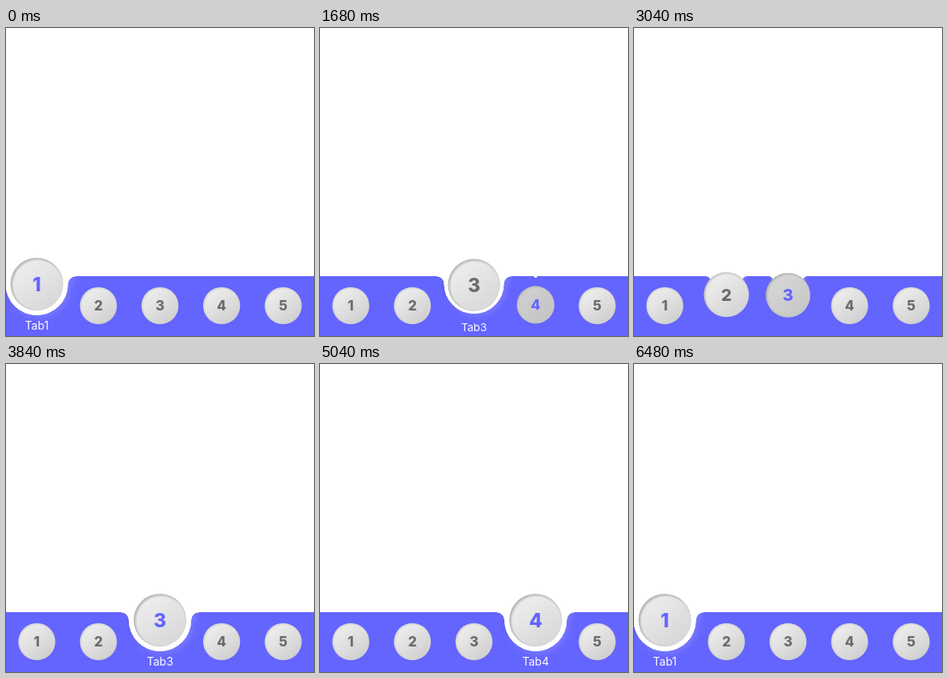
These frames come from a looping animation (386x386 px, 7.76 s). An HTML page with a canvas:

```html
<!DOCTYPE html>
<html lang="en">
<head>
<meta charset="utf-8">
<title>Tab bar</title>
<style>
  html, body { margin: 0; width: 100%; height: 100%; overflow: hidden; background: #fff; }
  canvas { display: block; width: 386px; height: 386px; }
</style>
</head>
<body>
<canvas id="stage"></canvas>
<script>
const SIZE = 386, LOOP = 7760, DURATION = 300;
const TABS = 5, BAR_TOP = 311, ACCENT = '#6464ff';

// Each click selects a tab; the pressed tint begins `lead` ms before it.
const clicks = [
  { tab: 0, at: -2000, lead: 1 },
  { tab: 1, at: 345, lead: 1 },
  { tab: 2, at: 1005, lead: 170 },
  { tab: 3, at: 1664, lead: 120 },
  { tab: 1, at: 2325, lead: 170 },
  { tab: 2, at: 2955, lead: 170 },
  { tab: 4, at: 4010, lead: 170 },
  { tab: 3, at: 4440, lead: 100 },
  { tab: 1, at: 5605, lead: 170 },
  { tab: 0, at: 6180, lead: 110 }
];

const canvas = document.getElementById('stage');
const ctx = canvas.getContext('2d');
const ratio = window.devicePixelRatio || 1;
canvas.width = canvas.height = SIZE * ratio;

const clamp = v => Math.max(0, Math.min(1, v));
const mix = (a, b, k) => a + (b - a) * k;
const gray = v => `rgb(${v},${v},${v})`;

// CSS "ease": cubic-bezier(.25, .1, .25, 1)
function ease(x) {
  if (x <= 0 || x >= 1) return clamp(x);
  const bezier = (a, b, s) => 3 * (1 - s) ** 2 * s * a + 3 * (1 - s) * s * s * b + s ** 3;
  let lo = 0, hi = 1;
  for (let i = 0; i < 20; i++) {
    const mid = (lo + hi) / 2;
    if (bezier(.25, .25, mid) < x) lo = mid; else hi = mid;
  }
  return bezier(.1, 1, lo);
}

function tabStates(t) {
  let last = 0;
  clicks.forEach((c, i) => { if (c.at <= t) last = i; });
  const current = clicks[last], previous = clicks[last - 1];
  const k = ease((t - current.at) / DURATION);
  return Array.from({ length: TABS }, (_, i) => ({
    label: i + 1,
    x: (i + .5) * SIZE / TABS,
    active: i === current.tab,
    open: i === current.tab ? k : previous && i === previous.tab ? 1 - k : 0,
    press: Math.max(...clicks.filter(c => c.tab === i).map(c =>
      clamp(Math.min((t - c.at + c.lead) / c.lead, (c.at + 320 - t) / 300))))
  }));
}

function notchPath(x, k) {
  ctx.beginPath();
  ctx.moveTo(x - 49 * k, BAR_TOP - 2);
  ctx.lineTo(x - 49 * k, BAR_TOP);
  ctx.arc(x - 49 * k, BAR_TOP + 10 * k, 10 * k, -Math.PI / 2, 0);
  ctx.arc(x, BAR_TOP + 10 * k, 39 * k, Math.PI, 0, true);
  ctx.arc(x + 49 * k, BAR_TOP + 10 * k, 10 * k, Math.PI, Math.PI * 1.5);
  ctx.lineTo(x + 49 * k, BAR_TOP - 2);
  ctx.closePath();
}

function drawNotch({ x, open }) {
  if (open <= 0) return;
  ctx.save();
  ctx.beginPath();
  ctx.rect(0, BAR_TOP, SIZE, SIZE - BAR_TOP);
  ctx.clip();
  notchPath(x, open);
  ctx.fillStyle = '#fff';
  for (const [color, offset, blur] of [['#5050d8', -1.5, 4], ['#7b7bff', 3, 8]]) {
    ctx.shadowColor = color;
    ctx.shadowOffsetX = ctx.shadowOffsetY = offset * open * ratio;
    ctx.shadowBlur = blur * open * ratio;
    ctx.fill();
  }
  ctx.restore();
  notchPath(x, open);
  ctx.fillStyle = '#fff';
  ctx.fill();
}

function drawText(text, x, y, size, weight, color) {
  ctx.font = `${weight} ${size}px Inter, sans-serif`;
  ctx.textAlign = 'center';
  ctx.fillStyle = color;
  ctx.fillText(text, x, y + size * .364);
}

function drawButton({ label, x, active, open, press }) {
  const y = mix(348, 321, open), r = mix(23.2, 33, open), scale = r / 23.2;
  ctx.beginPath();
  ctx.arc(x, y, r, 0, Math.PI * 2);

  const face = ctx.createLinearGradient(x - r * .6, y - r * .8, x + r * .6, y + r * .8);
  face.addColorStop(0, gray(mix(238, 208, press)));
  face.addColorStop(1, gray(mix(mix(208, 216, open), 196, press)));
  ctx.fillStyle = face;
  ctx.fill();

  // inset shadow, strongest at the top left
  const rim = ctx.createRadialGradient(x + scale, y + scale, r - 2 * scale, x + scale, y + scale, r + 1.5 * scale);
  rim.addColorStop(0, 'rgba(0,0,0,0)');
  rim.addColorStop(1, `rgba(0,0,0,${mix(.12, .3, open)})`);
  ctx.fillStyle = rim;
  ctx.fill();

  drawText(label, x, y, 17 * scale, 800, active ? ACCENT : '#6c6c6c');
}

function drawLabel({ label, x, open }) {
  if (open <= 0) return;
  ctx.globalAlpha = open;
  drawText('Tab' + label, x, mix(428, 373, open), 14 * mix(.3, 1, open), 400, '#fff');
  ctx.globalAlpha = 1;
}

function draw(now) {
  const tabs = tabStates(now % LOOP);
  ctx.setTransform(ratio, 0, 0, ratio, 0, 0);
  ctx.fillStyle = '#fff';
  ctx.fillRect(0, 0, SIZE, SIZE);
  ctx.fillStyle = ACCENT;
  ctx.fillRect(0, BAR_TOP, SIZE, SIZE - BAR_TOP);
  tabs.forEach(drawNotch);
  tabs.forEach(drawButton);
  tabs.forEach(drawLabel);
}

const start = performance.now();
function tick() {
  draw(performance.now() - start);
  requestAnimationFrame(tick);
}
tick();
</script>
</body>
</html>
```
